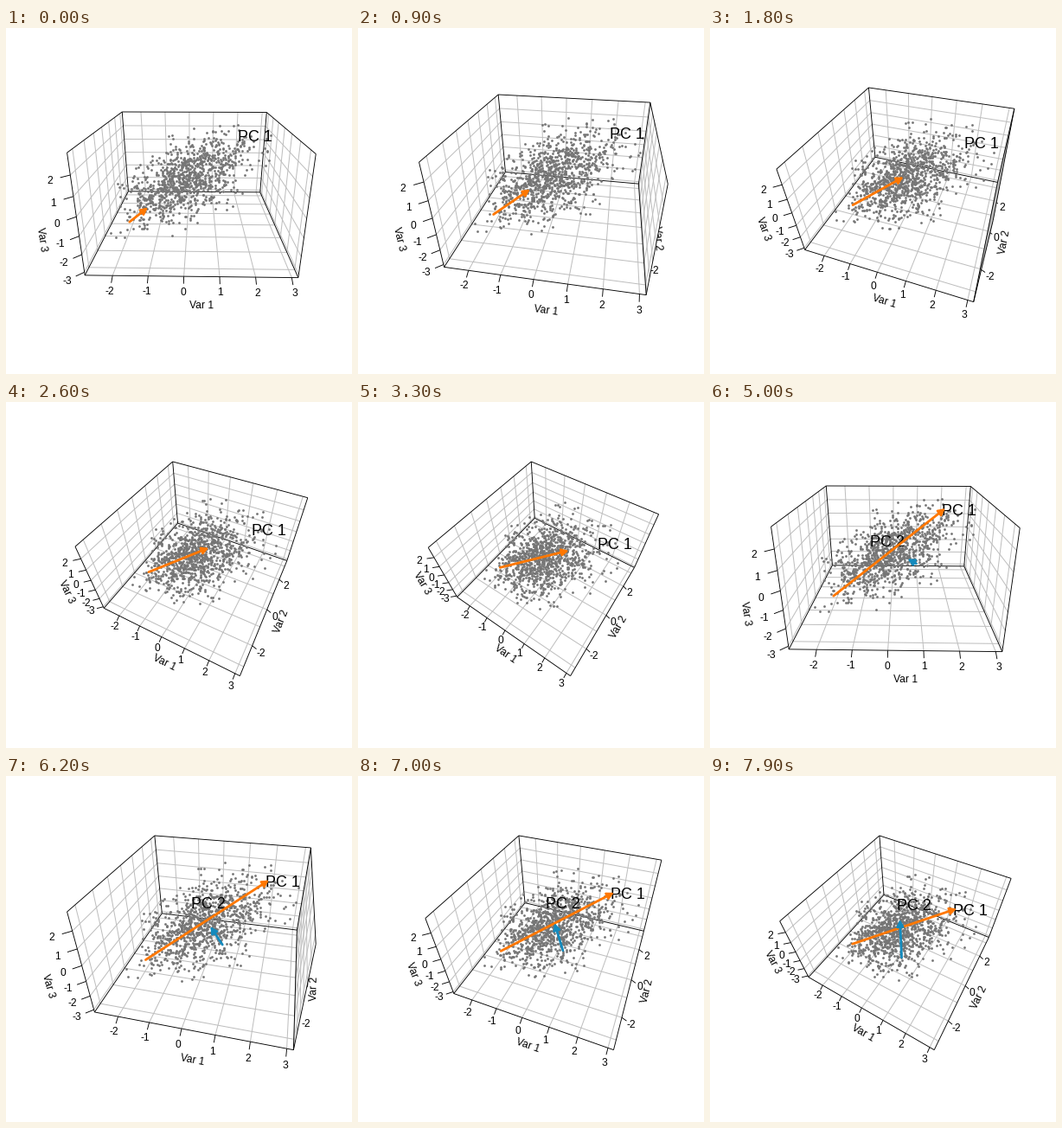
A matplotlib script for the animation above (8 s loop, 400 px wide and 400 px high).

```python
import numpy as np
import matplotlib.pyplot as plt
from matplotlib.animation import FuncAnimation
from matplotlib.collections import LineCollection, PolyCollection

SIZE, PT = 400, 0.72            # stage in px, points per px
FRAMES, TURN = 80, 50           # frames per loop, frames per camera sweep
LO = np.array([-2.78, -3.41, -3.18])
HI = np.array([3.18, 3.45, 2.99])
BOX = np.array([1, 1, 0.6])     # half sizes of the drawn box
EYE = np.sqrt(3) + 2
ORANGE, BLUE, GRID, DOT = "#ff7700", "#148abd", "#bebebe", "#757575"

plt.rcParams["font.family"] = "Liberation Sans"


def unit(p):
    """Data values to box coordinates."""
    return (2 * (np.asarray(p, float) - LO) / (HI - LO) - 1) * BOX


def flat(p, theta, phi):
    """Perspective view of box coordinates."""
    x, y, z = np.moveaxis(np.asarray(p, float), -1, 0)
    ct, st, cp, sp = np.cos(theta), np.sin(theta), np.cos(phi), np.sin(phi)
    across, deep = x * ct + y * st, y * ct - x * st
    w = EYE - z * sp + deep * cp
    return np.stack([across / w, (z * cp + deep * sp) / w], -1)


CORNERS = np.array([(x, y, z) for x in (-1, 1) for y in (-1, 1) for z in (-1, 1)]) * BOX
AREA = np.array([310.72 / 1.08, 267.52 / 1.08])
MIDDLE = np.array([214.4, 192.8])


def camera(k):
    """Projection to pixels, fitted to the plot area."""
    theta, phi = np.radians(1 + k), np.radians(21 + k)
    c = flat(CORNERS, theta, phi)
    lo, hi = c.min(0), c.max(0)
    scale = (AREA / (hi - lo)).min()
    return lambda p: MIDDLE + (flat(p, theta, phi) - (lo + hi) / 2) * scale * [1, -1]


def wall(axis, side):
    """Corner loop and grid segments of one box face."""
    a, b = [i for i in range(3) if i != axis]

    def at(u, v):
        p = np.zeros(3)
        p[axis], p[a], p[b] = side * BOX[axis], u, v
        return p

    A, B = BOX[a], BOX[b]
    loop = np.array([at(-A, -B), at(A, -B), at(A, B), at(-A, B)])
    lines = []
    for i, span, other in ((a, A, B), (b, B, A)):
        for n in range(int(np.ceil(LO[i])), int(np.floor(HI[i])) + 1):
            t = (2 * (n - LO[i]) / (HI[i] - LO[i]) - 1) * span
            ends = [(t, -other), (t, other)] if i == a else [(-other, t), (other, t)]
            lines.append([at(*e) for e in ends])
    return loop, np.array(lines)


WALLS = [wall(2, -1), wall(1, 1), wall(0, -1)]
RIGHT = wall(0, 1)

# axis index, title, ticks, edge position (also the outward direction)
AXES = [
    (0, "Var 1", range(-2, 4), (0, -1, -1)),
    (1, "Var 2", range(-2, 3, 2), (1, 0, -1)),
    (2, "Var 3", range(-3, 3), (-1, -1, 0)),
]


def on_axis(axis, value, edge, steps):
    p = np.array(edge, float) * BOX * (1 + 0.06 * steps)
    p[axis] = (2 * (value - LO[axis]) / (HI[axis] - LO[axis]) - 1) * BOX[axis]
    return p


# point cloud from its principal axes
rng = np.random.default_rng(7)
e1 = np.array([0.617, 0.334, 0.714])
e2 = np.array([-0.48, 0.876, -0.05])
e3 = np.cross(e1, e2)
cloud = rng.normal(size=(1100, 3)) * [1.38, 1.0, 0.48] @ np.array([e1, e2, e3])
cloud = unit(cloud[((cloud > LO) & (cloud < HI)).all(1)][:1000])

# tail, tip, colour, label, first frame
ARROWS = [
    (unit([-1.9, -1.03, -2.2]), unit([1.88, 1.03, 2.2]), ORANGE, "PC 1", 0),
    (unit([0.82, -1.4, 0.1]), unit([-0.73, 1.42, -0.07]), BLUE, "PC 2", TURN),
]

fig = plt.figure(figsize=(SIZE / 100, SIZE / 100), dpi=100, facecolor="white")
ax = fig.add_axes([0, 0, 1, 1])
ax.set(xlim=(0, SIZE), ylim=(SIZE, 0))
ax.axis("off")


def segments(color, width, z):
    return ax.add_collection(LineCollection([], colors=color, linewidths=width * PT, zorder=z))


def label(text, size, z):
    return ax.text(0, 0, text, fontsize=size * PT, ha="center", va="baseline",
                   rotation_mode="anchor", zorder=z)


def place(t, p, size, angle=0):
    a = np.radians(angle)
    t.set_position(p + 0.36 * size * np.array([np.sin(a), np.cos(a)]))
    t.set_rotation(angle)


ticks = segments("black", 0.9, 1)
panels = ax.add_collection(PolyCollection([], facecolors="white", edgecolors="none", zorder=2))
grid = segments(GRID, 1, 3)
edges = segments("black", 0.9, 4)
dots, = ax.plot([], [], "o", color=DOT, ms=2.8 * PT, mew=0, zorder=5)
numbers = [[label(str(n), 12, 1) for n in row[2]] for row in AXES]
titles = [label(row[1], 12, 1) for row in AXES]
tags = [label(row[3], 18, 6) for row in ARROWS]
shafts = [ax.plot([], [], color=row[2], lw=2.8 * PT, solid_capstyle="round", zorder=7 + i)[0]
          for i, row in enumerate(ARROWS)]
heads = [ax.fill([0, 0, 0], [0, 0, 0], fc=row[2], ec=row[2], lw=2.4 * PT,
                 joinstyle="round", zorder=7 + i)[0]
         for i, row in enumerate(ARROWS)]


def draw_box(view):
    shown = list(WALLS)
    # the right wall shows only while its inner side faces the viewer
    corner, back, _, top = view(RIGHT[0])
    u, v = back - corner, top - corner
    if u[0] * v[1] > u[1] * v[0]:
        shown.append(RIGHT)
    loops = [view(loop) for loop, _ in shown]
    panels.set_verts(loops)
    grid.set_segments([s for _, lines in shown for s in view(lines)])
    # shared edges are drawn once
    sides = {}
    for loop, _ in shown:
        for a, b in zip(loop, np.roll(loop, -1, 0)):
            sides[frozenset((tuple(a), tuple(b)))] = view([a, b])
    edges.set_segments(list(sides.values()))


def draw_axes(view):
    marks = []
    for (axis, _, values, edge), texts, title in zip(AXES, numbers, titles):
        def spot(v, steps):
            return view(on_axis(axis, v, edge, steps))

        for v, t in zip(values, texts):
            marks.append([spot(v, 0), spot(v, 1)])
            place(t, spot(v, 2), 12)
        first, last = values[0], values[-1]
        dx, dy = (spot(last, 0) - spot(first, 0)) * [1, -1]
        angle = np.degrees(np.arctan2(dy if dx > 0 else -dy, abs(dx)))
        place(title, spot((first + last) / 2, 3.6), 12, angle)
    ticks.set_segments(marks)


def draw_arrows(view, frame):
    for row, tag, shaft, head in zip(ARROWS, tags, shafts, heads):
        tail, tip, _, _, start = row
        on = frame >= start
        for artist in (tag, shaft, head):
            artist.set_visible(on)
        if not on:
            continue
        grow = min(1, 0.15 + 0.85 * (frame - start) / (TURN - 1))
        a, b = view(tail), view(tail + grow * (tip - tail))
        d = (b - a) / np.hypot(*(b - a))
        b = b - 1.6 * d
        side = np.array([-d[1], d[0]])
        back = b - 6.2 * d
        shaft.set_data(*np.array([a, b]).T)
        head.set_xy([b, back + 3.4 * side, back - 3.4 * side])
        place(tag, view(tip) + [16.7, 0.5], 18)


def draw(frame):
    view = camera(frame % TURN)
    draw_box(view)
    draw_axes(view)
    dots.set_data(*view(cloud).T)
    draw_arrows(view, frame)
    return []


anim = FuncAnimation(fig, draw, frames=FRAMES, interval=100, repeat=True, repeat_delay=0)
plt.show()
```
